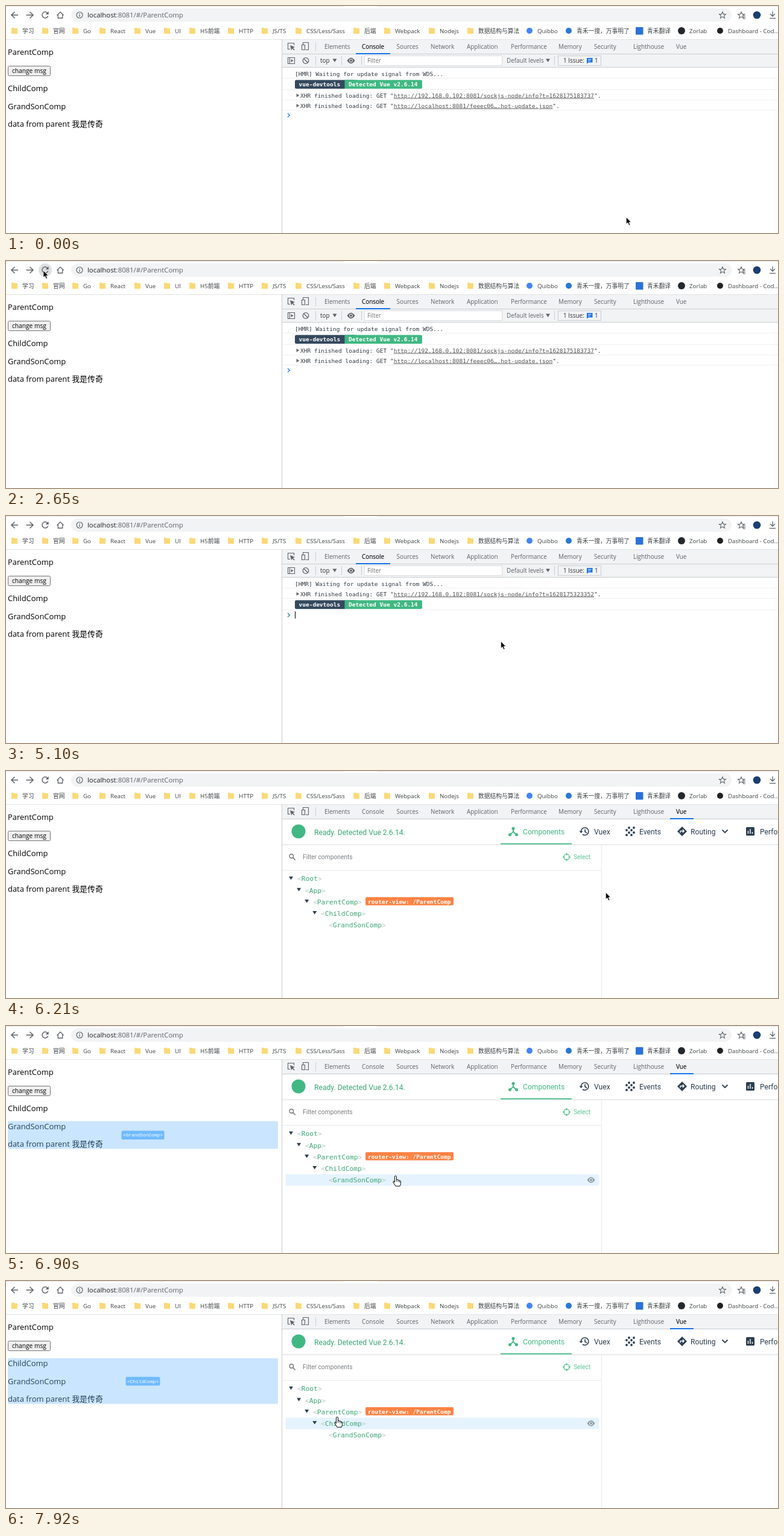
An HTML page that plays this animation: 1280x376 px, repeating every 8 s.

```html
<!DOCTYPE html>
<html lang="zh-CN">
<head>
<meta charset="utf-8">
<style>
  html, body { margin: 0; width: 100%; height: 100%; overflow: hidden; background: #fff; }
  svg { display: block; }
  text { white-space: pre; font-family: "Open Sans", "Noto Sans CJK SC", "Noto Sans CJK", sans-serif; }
  .page { font-size: 12.95px; }
  .mark { font-size: 9.75px; }
  .tab { font-size: 9.9px; }
  .url { font-size: 11.36px; }
  .btn { font-size: 10.2px; }
  .log, .tree, .bold { font-family: "DejaVu Sans Mono", monospace; font-size: 9.53px; }
  .tree { font-size: 11.25px; }
  .bold { font-weight: bold; }
  .vue, .small { font-family: Roboto, sans-serif; font-size: 12.15px; }
  .small { font-size: 10.25px; }
  .tag { font-family: "Liberation Mono", monospace; font-size: 7.85px; }
</style>
</head>
<body>
<svg width="1280" height="376">
  <g id="base"></g>
  <g id="console"></g>
  <g id="vue"></g>
  <g id="hover"></g>
  <g id="arrow"><path d="M0 0V11.3L2.6 8.9 4.6 13.4 6.5 12.5 4.6 8.2H8Z" stroke="#fff" stroke-width=".7"/></g>
  <g id="hand">
    <path d="M-1.5 9V-.3Q-1.5-1.7 0-1.7T1.5-.3V4.5Q3.8 3.6 4.2 5.2 6.2 4.6 6.6 6.2 8.6 5.8 8.6 8V10.5Q8.6 13 7.2 15.2H.2L-3.8 9Q-4.6 7.4-3.3 7T-1.5 9Z" fill="#fff" stroke="#000"/>
    <path d="M1.5 4.5V8M4.2 5.2V8.5M6.6 6.2V9" stroke="#000" stroke-width=".8"/>
  </g>
</svg>
<script>
const $ = id => document.getElementById(id);
const GREY = '#5f6368', DARK = '#2c3e50', GREEN = '#42b983', BLUE = '#1a73e8', BAR = '#f1f3f4', EDGE = '#cacdd1';
const esc = s => s.replace(/</g, '&lt;').replace(/>/g, '&gt;');
const raw = (x, y, s, cls, fill = '#000') => `<text x="${x}" y="${y}" class="${cls}" fill="${fill}">${s}</text>`;
const text = (x, y, s, cls, fill) => raw(x, y, esc(s), cls, fill);
const rect = (x, y, w, h, fill, more = '') => `<rect x="${x}" y="${y}" width="${w}" height="${h}" fill="${fill}" ${more}/>`;
const dot = (x, y, r, fill, more = '') => `<circle cx="${x}" cy="${y}" r="${r}" fill="${fill}" ${more}/>`;
const line = (d, color = GREY, w = 1.3) => `<path d="${d}" fill="none" stroke="${color}" stroke-width="${w}"/>`;
const fill = (d, color = GREY) => `<path d="${d}" fill="${color}"/>`;
const down = (x, y, color) => fill(`M${x} ${y}h7l-3.5 5.5z`, color);
const eye = (x, y, color) =>
  fill(`M${x - 6.5} ${y}q6.5-9.5 13 0q-6.5 9.5-13 0z`, color) + dot(x, y, 2.9, '#fff') + dot(x, y, 2, color);
const star = x => line(`M${x} 9.8l1.5 3.6 4 .2-3 2.6 1 3.9-3.5-2.2-3.5 2.2 1-3.9-3-2.6 4-.2z`, GREY, 1.1);

function toolbar() {
  const folders = { 学习: 27, 官网: 78, Go: 128, React: 173, Vue: 231, UI: 280, H5前端: 322, HTTP: 386, 'JS/TS': 442,
    'CSS/Less/Sass': 498, 后端: 594, Webpack: 645, Nodejs: 719, 数据结构与算法: 783 };
  const sites = { Quibbo: 881, '青禾一搜，万事明了': 946, 青禾翻译: 1063, Zorlab: 1133, 'Dashboard - Cod...': 1197 };
  let s = rect(0, 0, 560, 1, '#e3e5e8') + rect(615, 0, 665, 1, '#e3e5e8')
    + rect(108, 4, 1095, 22, BAR, 'rx="11"')
    + dot(65, 15, 11, '#dfe0e2', 'id="halo"')
    + line('M20 15H9.5M14.5 9.7L9 15l5.5 5.3M33.5 15H44M39.5 9.7L45 15l-5.5 5.3', GREY, 1.5)
    + `<g id="reload">${line('M69 11.9A5 5 0 1 0 69.7 16.5', GREY, 1.5)}${fill('M70.6 9v5h-5z')}</g>`
    + `<g id="stop">${line('M61 11l8 8m0-8l-8 8', GREY, 1.5)}</g>`
    + line('M84.5 15.5L90 10l5.5 5.5M86.3 14.5V20H93.7V14.5')
    + dot(122, 15, 5, 'none', `stroke="${GREY}" stroke-width="1.2"`) + line('M122 14.2v3.6M122 12v1.2')
    + raw(135, 19, `localhost<tspan fill="${GREY}">:8081/#/ParentComp</tspan>`, 'url', '#202124')
    + star(1188) + star(1219) + line('M1221 16h5M1222 18.5h4M1222 21h4', GREY, 1.1)
    + dot(1245, 15, 6.3, '#1c3f73')
    + line('M1271 9v7.5M1267 13l4 4 4-4M1266 20.3h10');
  for (const name in folders) {
    const x = folders[name];
    s += fill(`M${x - 18} 36h4l1 1h5v9h-10z`, '#fbd978') + text(x, 44.5, name, 'mark', '#3c4043');
  }
  for (const name in sites) s += text(sites[name], 44.5, name, 'mark', '#3c4043');
  return s + dot(868, 41, 5, '#4285f4') + dot(933, 41, 5, '#2878d8') + rect(1044, 35, 12.5, 12.5, '#2b72d9', 'rx="1"')
    + dot(1120, 41, 6, '#24292e') + dot(1184, 41, 5, '#222') + rect(0, 55, 1280, 1, '#e1e3e6');
}

const page = () => text(3, 81.2, 'ParentComp', 'page')
  + rect(3.5, 99.5, 70, 16, '#efefef', 'rx="2" stroke="#767676"') + text(10, 111, 'change msg', 'btn')
  + text(3, 141.2, 'ChildComp', 'page') + text(3, 170.7, 'GrandSonComp', 'page')
  + text(3, 200, 'data from parent 我是传奇', 'page');

function devtools() {
  const tabs = { Elements: 528, Console: 590, Sources: 647.5, Network: 704, Application: 764, Performance: 837,
    Memory: 916, Security: 975, Lighthouse: 1040, Vue: 1111 };
  let s = rect(457, 55, 1, 321, EDGE) + rect(458, 56, 822, 24, BAR) + rect(458, 79, 822, 1, EDGE)
    + line('M477.5 65V61.5H467.5V71.5H471', GREY, 1.1) + fill('M471 65l8 3-3.2 1.4 3 3-1.2 1.2-3-3-1.4 3z')
    + line('M492.5 64V60.5H501.5V72.5H497M490.5 64.5h5v8h-5z', GREY, 1.1) + rect(513, 60, 1, 15, EDGE);
  for (const name in tabs) s += text(tabs[name], 71.3, name, 'tab', GREY);
  return s;
}

const consoleBar = () => rect(458, 80, 822, 22, BAR) + rect(458, 101, 822, 1, EDGE)
  + text(590, 71.3, 'Console', 'tab', '#202124') + rect(580, 78, 57, 2, BLUE)
  + line('M467.5 85.5h11v10h-11zM470.3 85.5v10', GREY, 1.1) + fill('M472.5 88l4 2.5-4 2.5z')
  + dot(497, 90.5, 4.8, 'none', `stroke="${GREY}" stroke-width="1.3"`) + line('M493.7 87.2l6.6 6.6')
  + [513, 556, 589, 909].map(x => rect(x, 83, 1, 15, EDGE)).join('')
  + text(521, 94, 'top', 'tab', '#333') + down(541.5, 87.5) + eye(572, 90.5, GREY)
  + rect(594.5, 82.5, 228, 16, '#fff', 'stroke="#dadce0"') + text(599, 94.3, 'Filter', 'tab', '#757575')
  + text(830, 94, 'Default levels', 'tab', GREY) + down(895, 87.5)
  + rect(915.5, 82.5, 71, 16, BAR, `stroke="${EDGE}"`) + text(924, 94, '1 Issue:', 'tab', '#333')
  + fill('M963 86h9.5v7.5h-7l-2.5 2.3z', BLUE) + line('M965 88.4h5.5M965 91h4', '#fff', .9) + text(976, 94, '1', 'tab', '#333');

const hmr = { h: 17, draw: y => text(479, y + 13.5, '[HMR] Waiting for update signal from WDS...', 'log', '#303942') };
const badge = { h: 19, draw: y => rect(479, y + 3, 100, 14.5, '#35495e', 'rx="2.5"') + rect(570, y + 3, 120, 14.5, '#41b883', 'rx="2.5"')
  + rect(561.5, y + 3, 20, 14.5, '#41b883')
  + text(485.5, y + 13.7, 'vue-devtools', 'bold', '#fff') + text(568, y + 13.7, 'Detected Vue v2.6.14', 'bold', '#fff') };
const xhr = url => ({ h: 17, draw: y => fill(`M481.5 ${y + 6.5}v6l5-3z`, '#6e6e6e')
  + raw(488, y + 13, `XHR finished loading: GET "<tspan fill="#545454" text-decoration="underline">${url}</tspan>".`, 'log', '#303942') });
const info = id => xhr('http://192.168.0.102:8081/sockjs-node/info?t=' + id);

const logs = [
  [0, [hmr, badge, info(1628175183737), xhr('http://localhost:8081/feeec06….hot-update.json')]],
  [3260, [hmr]],
  [4270, [hmr, info(1628175323352)]],
  [4480, [hmr, info(1628175323352), badge]],
];

function consoleView(rows, focused, caret) {
  let y = 102.5, s = consoleBar();
  for (const row of rows) {
    s += row.draw(y);
    y += row.h;
    s += rect(458, y - .5, 822, 1, '#f0f0f0');
  }
  return s + line(`M467 ${y + 5.3}l3.3 3.2-3.3 3.2`, focused ? '#2a8a83' : '#367cf1', 1.4)
    + (caret ? rect(479, y + 2.5, 1, 12, '#000') : '');
}

const names = ['Root', 'App', 'ParentComp', 'ChildComp', 'GrandSonComp'];
const rowY = i => 178.5 + 19.1 * i;

function vueView(active) {
  let s = rect(458, 80, 822, 296, '#fff') + text(1111, 71.3, 'Vue', 'tab', '#202124') + rect(1101, 78, 39, 2, BLUE)
    + rect(458, 121, 822, 1, '#e3e6e8') + rect(458, 122, 822, 2, '#f6f7f8')
    + dot(485, 100, 11.5, '#41b883') + text(511, 105.5, 'Ready. Detected Vue 2.6.14.', 'vue', '#3ba776')
    + line('M841 96v4.5L835.5 106M841 100.5L846.5 106', GREEN, 1.8)
    + dot(841, 95.3, 2.5, GREEN) + dot(835.5, 105.5, 2.5, GREEN) + dot(846.5, 105.5, 2.5, GREEN)
    + text(857, 104.7, 'Components', 'vue', GREEN) + rect(820, 119.7, 118, 1.8, GREEN)
    + line('M953.5 100A6.2 6.2 0 1 1 956 105M960 96.5v4l3 2', DARK, 1.6) + fill('M950.5 99.5h6l-3 3.5z', DARK)
    + text(975, 104.7, 'Vuex', 'vue', DARK);
  for (let i = 0; i < 16; i++) {
    const col = i % 4, row = i >> 2;
    if ((col + row) % 2) s += dot(1029 + col * 4, 94 + row * 4, 1.9, DARK);
  }
  s += text(1050, 104.7, 'Events', 'vue', DARK)
    + fill('M1121 92l8 8-8 8-8-8z', DARK) + line('M1118 102.5v-3h5.5M1121.8 97l2.5 2.5-2.5 2.5', '#fff')
    + text(1135, 104.7, 'Routing', 'vue', DARK) + line('M1187.5 97.5l4.5 4.5 4.5-4.5', DARK, 1.8)
    + rect(1227, 93, 14, 14, DARK, 'rx="1.5"') + line('M1230.5 104v-5M1234 104v-8M1237.5 104v-3', '#fff', 1.4)
    + text(1250, 104.7, 'Performance', 'vue', DARK)
    + rect(458, 164, 529, 1, '#e7eaec') + rect(987, 122, 1, 254, '#e7eaec')
    + dot(473.3, 141, 3.2, 'none', 'stroke="#777" stroke-width="1.4"') + line('M475.7 143.5l4 4', '#777', 1.6)
    + text(492, 146, 'Filter components', 'small', '#7b7f83')
    + dot(929.5, 142.5, 4.7, 'none', `stroke="${GREEN}" stroke-width="1.2"`)
    + line('M929.5 136v3.5M929.5 145.5v3.5M923 142.5h3.5M932.5 142.5h3.5', GREEN, 1.2)
    + text(941, 146, 'Select', 'small', '#5fc398');
  if (active >= 0) s += rect(463.5, rowY(active) - 9.3, 519.5, 19, '#e5f3ff', 'rx="2"') + eye(970, rowY(active), '#8c9aa3');
  names.forEach((name, i) => {
    const y = rowY(i), bracket = c => `<tspan fill="#bac6c4">${c}</tspan>`;
    if (i < 4) s += down(469 + 13.1 * i, y - 3.8, DARK);
    s += raw(483 + 13 * i, y + 3.9, bracket('&lt;') + name + bracket('&gt;'), 'tree', '#3ba776');
  });
  return s + rect(596, 209, 146, 13.5, '#ff8344', 'rx="2"') + text(600, 219.5, 'router-view: /ParentComp', 'bold', '#fff');
}

function pageOverlay(active) {
  if (active < 0) return '';
  const top = [68, 68, 68, 128, 157.5][active], mid = (top + 203.5) / 2, label = `<${names[active]}>`, w = label.length * 4.71 + 5;
  return rect(3, top, 448, 203.5 - top, 'rgba(104,182,255,.35)', 'rx="2"')
    + rect(227 - w / 2, mid - 6.9, w, 14.4, '#70baff', 'rx="2"') + text(229.5 - w / 2, mid + 2.8, label, 'tag', '#fff');
}

// Pointer path: time, x, y
const path = [[0, 1029, 350], [850, 504, 279], [1680, 166, 152], [2510, 62, 16], [2720, 62, 16], [2930, 392, 193],
  [3190, 392, 193], [3500, 620, 228], [3780, 1032, 205], [4060, 897, 180], [4400, 800, 225], [4700, 727, 243],
  [4960, 727, 243], [5100, 820, 208], [5650, 1121, 66], [5850, 1121, 66], [6210, 995, 201], [6620, 738, 251],
  [6690, 738, 251], [6900, 646, 250], [7390, 571, 252], [7520, 571, 252], [7920, 549, 227], [8000, 549, 227]];

function pointer(t) {
  const i = path.findIndex(p => p[0] > t), [t0, x0, y0] = path[i - 1], [t1, x1, y1] = path[i], k = (t - t0) / (t1 - t0);
  return [x0 + (x1 - x0) * k, y0 + (y1 - y0) * k];
}

const shown = {};
function put(id, key, draw) {
  if (shown[id] === key) return;
  shown[id] = key;
  $(id).innerHTML = draw();
}
const show = (id, on) => $(id).style.display = on ? '' : 'none';

$('base').innerHTML = toolbar() + page() + devtools();

function frame(now) {
  const t = now % 8000, [x, y] = pointer(t), vue = t >= 5850;
  const active = vue && x < 983 && y > 169 ? Math.floor((y - 169.4) / 19.1) : -1;
  const step = logs.filter(l => l[0] <= t).length - 1, focused = t >= 4480, caret = t >= 4960 && t < 5460;
  const loading = t >= 2790 && t < 3260, hand = active >= 0;
  put('console', vue ? 'off' : `${step}${focused}${caret}`, () => vue ? '' : consoleView(logs[step][1], focused, caret));
  put('vue', vue ? active : 'off', () => vue ? vueView(active) : '');
  put('hover', active, () => pageOverlay(active));
  show('halo', t >= 2580 && t < 2790);
  show('reload', !loading);
  show('stop', loading);
  show('hand', hand);
  show('arrow', !hand);
  $(hand ? 'hand' : 'arrow').setAttribute('transform', `translate(${x} ${y})`);
  requestAnimationFrame(frame);
}
frame(performance.now());
</script>
</body>
</html>
```
